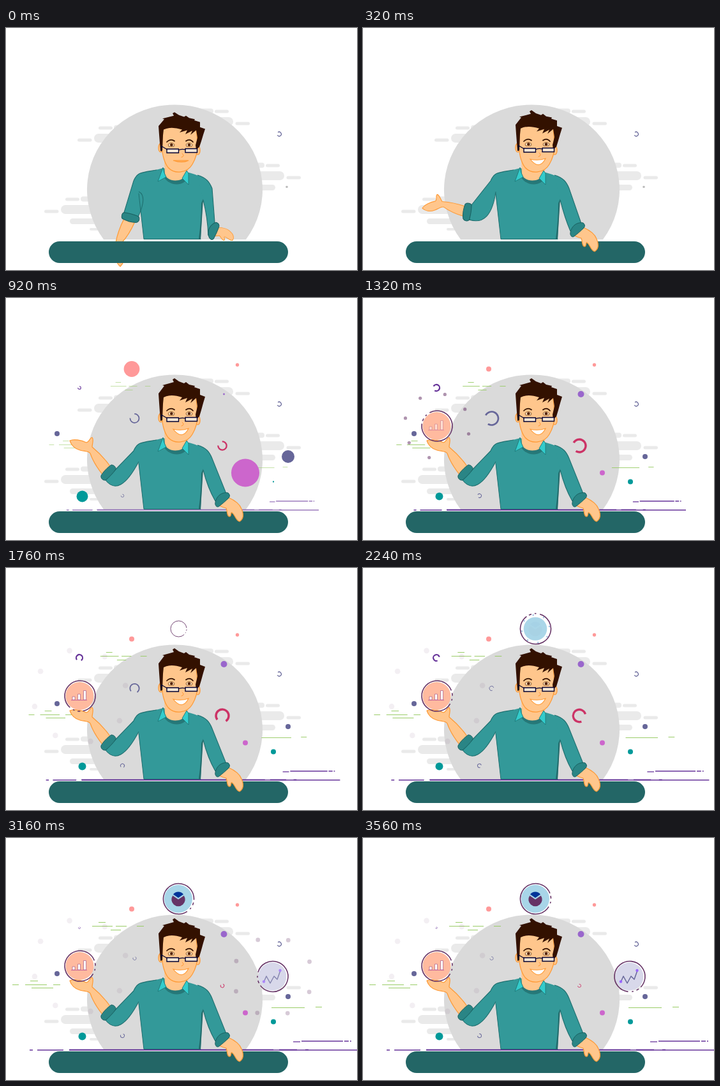
Write an HTML page that moves like this. It is 550 px wide and 380 px high and loops after 3.6 s.

```html
<!DOCTYPE html>
<html lang="en">
<head>
<meta charset="utf-8">
<title>Presenter</title>
<style>
html, body { margin: 0; width: 100%; height: 100%; overflow: hidden; background: #fff; }
svg { display: block; width: 550px; height: 380px; }
.line { fill: none; stroke-linecap: round; stroke-linejoin: round; }
.flat { fill: none; }
.cloth { fill: #339999; stroke: #1f6f6f; stroke-width: 1.1; stroke-linejoin: round; }
.cuff { fill: #2a8585; stroke: #1a6060; stroke-width: 1; }
.skin { fill: #ffc68c; stroke: #ff9933; stroke-width: 1.2; stroke-linejoin: round; }
</style>
</head>
<body>
<svg viewBox="0 0 550 380" xmlns="http://www.w3.org/2000/svg">
  <defs>
    <g id="cloud" fill="#eaeaea">
      <rect x="93" y="266.5" width="22" height="5" rx="2.5"/>
      <rect x="117" y="264.5" width="33" height="8" rx="4"/>
      <rect x="86" y="278" width="64" height="14" rx="7"/>
      <rect x="60" y="285.5" width="22.5" height="5" rx="2.5"/>
      <rect x="100" y="299" width="50" height="9" rx="4.5"/>
      <rect x="131" y="314" width="29" height="4" rx="2"/>
    </g>
  </defs>
  <use href="#cloud"/>
  <use href="#cloud" x="52" y="-112"/>
  <use href="#cloud" transform="translate(522 -53) scale(-1 1)"/>
  <use href="#cloud" transform="translate(442 -138) scale(-1 1)"/>
  <path d="M153 332A137.5 133.5 0 1 1 376 332Z" fill="#dadada"/>
  <circle cx="440" cy="249.5" r="1.8" fill="#bbb"/>
  <g id="purple" class="flat" stroke="#663399" stroke-width="1.3"></g>
  <g id="green" class="flat" stroke="#99cc66"></g>
  <g id="dots"></g>
  <g id="arcs" class="flat"></g>
  <g id="bursts"></g>

  <path id="handL" class="skin" d="M163 264C156 254 146 243 135 234C135 229 138 222 135 219C131 219 131 226 126 227C118 223 106 221 100 224C102 231 108 237 116 239C124 241 130 240 132 244C136 256 144 268 151 277"/>
  <path d="M246 220C228 225 212 226 204 232L208 262L216 331.5H305L308 275L319 247C315 236 298 230 286 227Z" fill="#339999"/>
  <path d="M309 268L305 331.5H302Q306 300 306 275Z" fill="#236b6b"/>
  <path id="sleeveL" class="cloth"/>
  <path id="cuffL" class="cuff" d="M165 262C169 262 173 266 172 269C168 275 162 281 156 286C152 287 148 283 149 279C152 273 159 266 165 262Z"/>
  <path class="line" stroke="#1f6f6f" d="M208 260L216 331.5H305"/>
  <path id="sleeveR" class="cloth"/>
  <path d="M246 230C251 248 279 252 286 233L284 229L249 228Z" fill="#267878"/>
  <path d="M248 208L249 231C256 243 276 242 284 230L287 210Z" fill="#ffc68c"/>
  <path d="M246 219L238 241L251 234Q247 227 246 219ZM283 224L276 236L286 246L286 228Z" fill="#33cccc" stroke="#1f7777" stroke-width=".9"/>

  <ellipse class="skin" cx="242.5" cy="188" rx="3.6" ry="7"/>
  <ellipse class="skin" cx="300.5" cy="192" rx="3.6" ry="7"/>
  <path class="skin" d="M245 155C262 145 285 150 298 158L300 178C301 192 298 204 292 214C284 228 264 230 254 219C247 210 244 195 244 178Z"/>
  <path id="hair" fill="#331100" d="M239 150L248 138L245 137L256 134L263 132L261 128L264 126L271 131L279 134L282 132L287 136L296 138L295 140L304 143V152L312 155L309 165L306 176L303 186L298 191L297 183L300 170L298 157L289 165L292 158L281 164L284 157L272 161L276 156Q258 150 247 156L246 166L245 192L242 193L240 165Z"/>
  <g id="eyes">
    <path class="line" stroke="#331100" stroke-width="1.7" d="M252 177Q258 171 264 175.500M282 175.500Q288 171 293 177"/>
    <path d="M254 181Q259 176 264 181L263 184H255ZM282 181Q287 176 292 181L291 184H283Z" fill="#ffe3c4" stroke="#663300" stroke-width=".7"/>
    <circle cx="259.3" cy="181.500" r="2.300" fill="#552200"/><circle cx="287" cy="181.500" r="2.300" fill="#552200"/>
    <path class="line" stroke="#ff9933" d="M276 195Q281 199 275 201"/>
    <path d="M252 188H270.500V194H252ZM281 187.500H299.500V193.500H281Z" fill="#f8e6d5" stroke="#000033" stroke-width="1.4"/>
    <path class="line" stroke="#000033" stroke-width="1.3" d="M271 189.500Q276 187.500 281 189M252 188.500L243.500 183.500V191"/>
  </g>
  <path id="mouth" stroke="#ff9933" stroke-width="1.1"/>

  <rect x="67" y="335" width="375" height="34" rx="17" fill="#236666"/>
  <path id="handR" class="skin" d="M348 313C357 317 366 323 369 331C373 340 372 347 366 351C361 350 360 344 356 339C351 333 354 341 351 343C346 344 347 335 345 330C341 329 338 328 334 326"/>
  <path id="cuffR" class="cuff" d="M335 309C339 306 345 305 348 306C351 309 351 311 349 314C345 318 338 324 334 327C330 330 327 325 328 321C329 316 331 312 335 309Z"/>
  <g id="rings"></g>
</svg>
<script>
const LOOP = 3600, STEP = 40, RAD = Math.PI / 180;
const $ = id => document.getElementById(id);
const set = (el, attrs) => { for (const k in attrs) el.setAttribute(k, attrs[k]); return el; };
const add = (parent, tag, attrs) =>
  parent.appendChild(set(document.createElementNS('http://www.w3.org/2000/svg', tag), attrs));
const mix = (a, b, k) => a + (b - a) * k;
// Linear ramp from 0 to 1 between a and b.
const ramp = (t, a, b) => Math.max(0, Math.min(1, (t - a) / (b - a)));

// Speed lines: start, height, dash pattern
const streak = (id, x, y, dash) =>
  add($(id), 'path', { d: `M${x} ${y}H550`, 'stroke-dasharray': dash + ' 999' });
streak('purple', 37, 333, '5 7 41 9 0 0');
streak('purple', 99, 332.5, '320 9 28 13 5');
streak('purple', 450, 320, '11');
streak('purple', 463, 319, '65 2 7 2 2');
streak('green', 10, 230.5, '10 10 34 10 11');
streak('green', 38, 224.5, '12');
streak('green', 40, 235.5, '34');
streak('green', 135, 138.5, '32 5 17 16 11');
streak('green', 145, 132.5, '11');
streak('green', 164, 144.5, '16');
streak('green', 416, 266.5, '52');
streak('green', 485, 265.5, '10');

// Each arm: wrist pivot as drawn, then [x, y, turn, reach] at rest, out, raised
const arms = {
  L: { pivot: [160, 274], poses: [[195, 298, -118, 1], [163, 289, -35, .9], [160, 274, 0, 1]] },
  R: { pivot: [339, 317], poses: [[326, 319, -25, .75], [336, 317, 0, 1], [339, 317, 0, 1]] }
};

// Moves hand and cuff; returns a function that maps wrist offsets to the stage.
function poseArm(side, p) {
  const { pivot: [px, py], poses } = arms[side], i = Math.min(1, Math.floor(p));
  const [x, y, turn, reach] = poses[i].map((v, n) => mix(v, poses[i + 1][n], p - i));
  const move = k => `translate(${x} ${y}) rotate(${turn}) scale(${k}) translate(${-px} ${-py})`;
  set($('hand' + side), { transform: move(reach) });
  set($('cuff' + side), { transform: move(1) });
  const c = Math.cos(turn * RAD), s = Math.sin(turn * RAD);
  return (dx, dy) => `${x + dx * c - dy * s} ${y + dx * s + dy * c}`;
}

function drawPerson(t) {
  const p = ramp(t, 0, 320) + ramp(t, 320, 480), lift = p / 2, smile = Math.min(1, p);
  const left = poseArm('L', p), right = poseArm('R', p);
  set($('sleeveL'), { d: `M236 223C212 227 206 226 200 240L${left(12, -5)}L${left(-4, 12)}Q${left(18, 40)} 208 257` });
  set($('sleeveR'), { d: `M300 231C314 235 319 242 323 252L${right(6, -10)}L${right(-11, 2)}Q316 298 309 270` });
  set($('mouth'), {
    d: `M262 ${208 - 2 * smile}Q274 ${208 + smile} 286 ${208 - 3 * smile}Q276 ${213 + 11 * smile} 262 ${208 - 2 * smile}Z`,
    fill: smile < .5 ? '#ffad5c' : '#fff'
  });
  set($('hair'), { transform: `translate(0 ${195 * .09 * (1 - lift)}) scale(1 ${.91 + .09 * lift})` });
  set($('eyes'), { transform: `translate(0 ${2 - 2 * lift})` });
}

// Popping dots: x, y, colour, resting radius, start
const dots = [
  [197, 111.5, '#ff9999', 4, 658], [375, 274.5, '#cc66cc', 4, 771],
  [442, 249, '#666699', 4, 630], [119.5, 311.5, '#009999', 6, 583],
  [80, 213, '#666699', 4, 560], [362.5, 105, '#ff9999', 2.7, 560],
  [341.5, 151, '#9966cc', 5, 914], [419, 288.5, '#009999', 4, 914]
].map(([cx, cy, fill, r, born]) => ({ el: add($('dots'), 'circle', { cx, cy, fill }), r, born }));

function drawDot(d, t) {
  const u = (t - d.born) / 360;
  set(d.el, { r: d.r * (6 * ramp(u, 0, .35) - 5 * ramp(u, .35, 1)) });
}

// Open arcs: x, y, colour, radius, weight, start, shrink start
const arcs = [
  [115, 141, '#663399', 5, .45, 700, 2200], [201.5, 189, '#666699', 10.5, .25, 600, 1340],
  [339, 232, '#cc3366', 10, .34, 600, 2200], [182.5, 310.5, '#666699', 3, .33, 560, LOOP],
  [428, 166.5, '#666699', 3.3, .38, -LOOP, LOOP]
].map(([x, y, stroke, r, w, born, fade]) =>
  ({ el: add($('arcs'), 'circle', { stroke, pathLength: 360, 'stroke-dasharray': '275 85' }), x, y, r, w, born, fade }));

function drawArc(a, t) {
  const r = a.r * (ramp(t, a.born, a.born + 480) - .75 * ramp(t, a.fade, a.fade + 1000));
  const gap = a.born < 0 ? 190 : 3 - .15 * Math.min(t, 3360);
  set(a.el, { r, 'stroke-width': r * a.w, transform: `translate(${a.x} ${a.y}) rotate(${gap - 317})` });
}

// Chart badges: gap is the starting angle of the opening in the ring
const bar = (x, h) => `<path d="M${x} 207V${207 - h}h4V207Z" fill="#fff" stroke="#b3668c" stroke-width=".8"/>`;
const badges = [
  { x: 116, y: 201, fill: '#ffba9f', dot: '#663366', born: 1120, span: 230, gap: -95, linger: .08,
    icon: '<path d="M102 207.500H127" stroke="#cc6699"/>' + bar(104, 5) + bar(112.5, 9) + bar(121.5, 14.5) },
  { x: 270.5, y: 95.5, fill: '#a8d5e8', dot: '#6699cc', born: 1560, span: 1080, gap: 70, linger: 0,
    icon: '<path d="M270 96.500L278.800 90.500A10.700 10.700 0 1 1 261.200 90.500Z" fill="#663366"/><path d="M270 94L262 88.500A10 10 0 0 1 278 88.500Z" fill="#003399"/>' },
  { x: 418, y: 217.5, fill: '#d8d8ea', dot: '#663366', born: 2200, span: 1000, gap: 50, linger: 0,
    icon: '<path class="line" d="M404 226L408 217L414 228L420 217L425 222L430 208" stroke="#666699" stroke-width="1.500"/><circle cx="404" cy="225.500" r="2.200" fill="#9966ff"/><circle cx="429.500" cy="208" r="2.200" fill="#9966ff"/>' }
];
for (const b of badges) {
  b.dots = Array.from({ length: 8 }, () => add($('bursts'), 'circle', { fill: b.dot }));
  b.discEl = add($('rings'), 'circle', { cx: b.x - .5, cy: b.y, fill: b.fill });
  b.ringEl = add($('rings'), 'circle', { class: 'flat', r: 24, stroke: '#663366', 'stroke-width': 1.6,
    pathLength: 360, 'stroke-dasharray': '308 10 10 12 6 14' });
  b.iconEl = add($('rings'), 'g', {});
  b.iconEl.innerHTML = b.icon;
}

function drawBadge(b, t) {
  const u = (t - b.born) / b.span;
  const disc = ramp(u, .38, .68), fly = ramp(u, .45, 1.05);
  const gap = Math.max(-355, b.gap - .25 * (t - b.born));
  set(b.ringEl, { transform: `translate(${b.x} ${b.y}) rotate(${gap - 334}) scale(${ramp(u, .06, .3)})` });
  set(b.discEl, { r: 22 * disc, opacity: disc * (2 - disc) });
  set(b.iconEl, { opacity: ramp(u, .62, 1.1) });
  b.dots.forEach((el, i) => {
    const a = (60 * fly - 163 + i * 45) * RAD, far = 73 * fly;
    set(el, {
      cx: b.x + far * Math.cos(a), cy: b.y + far * Math.sin(a), r: 1 + 3.3 * fly * fly,
      opacity: mix(.6 * ramp(fly, 0, .1), b.linger, ramp(fly, .65, 1))
    });
  });
}

function render(t) {
  drawPerson(t);
  const s = mix(.722, 1, ramp(t, 600, 2430));
  for (const [id, cx] of [['purple', 289], ['green', 261]])
    set($(id), { transform: `translate(${cx * (1 - s)} 0) scale(${s} 1)`, opacity: ramp(t, 560, 1120) });
  dots.forEach(d => drawDot(d, t));
  arcs.forEach(a => drawArc(a, t));
  badges.forEach(b => drawBadge(b, t));
}

const start = performance.now();
function tick() {
  const t = (performance.now() - start) % LOOP;
  render(Math.floor(t / STEP) * STEP);
  requestAnimationFrame(tick);
}
tick();
</script>
</body>
</html>
```
